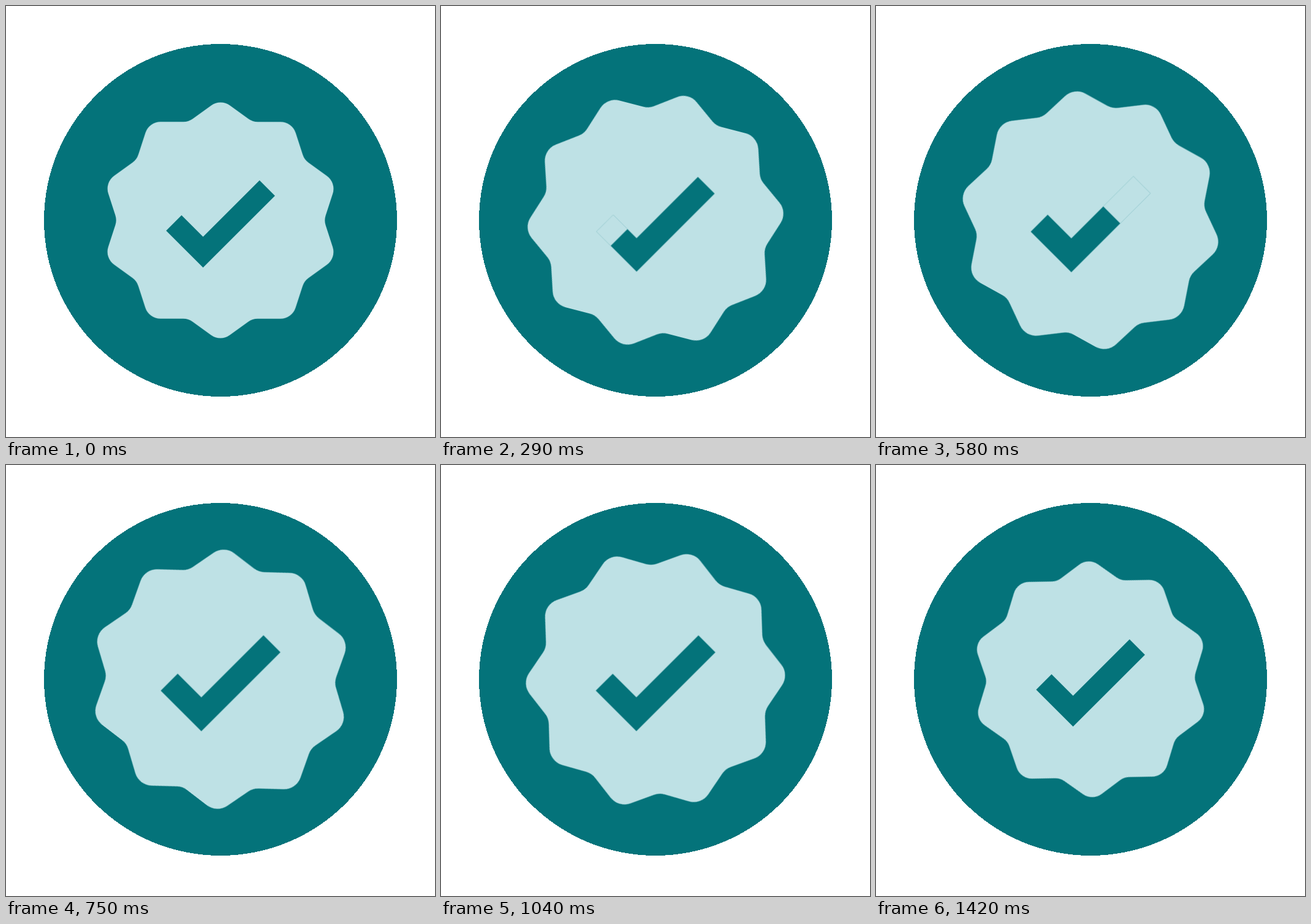
An HTML page that plays this animation: 700 by 704 pixels, repeating every 1.46 s.

```html
<!DOCTYPE html>
<html lang="en">
<head>
<meta charset="utf-8">
<title>Verified badge</title>
<style>
  :root { --teal: #04737a; --pale: #bee1e5; }
  html, body { margin: 0; width: 100%; height: 100%; overflow: hidden; background: #fff; }
  svg { display: block; width: 700px; height: 704px; }

  .disc { fill: var(--teal); shape-rendering: crispEdges; }
  .seal { fill: var(--pale); }
  .tick { fill: none; stroke: var(--teal); stroke-width: 35.6; stroke-linejoin: miter; }
  .wipe { stroke: var(--pale); stroke-dasharray: 3 30; stroke-dashoffset: 4; }

  .pulse, .seal, .wipe { animation: 1460ms linear infinite; }
  .pulse { animation-name: pulse; }
  .seal { animation-name: spin; }
  .wipe { animation-name: wipe; }

  @keyframes pulse {
    0% { transform: scale(1); animation-timing-function: cubic-bezier(.45, 0, .55, 1); }
    27.4% { transform: scale(1.1); }
    69.04% { transform: scale(1.1); animation-timing-function: cubic-bezier(.45, 0, .55, 1); }
    96.44%, 100% { transform: scale(1); }
  }
  @keyframes spin {
    from { transform: rotate(0deg); }
    to { transform: rotate(73deg); }
  }
  /* A pale dash runs along the tick, hiding it and then revealing it again. */
  @keyframes wipe {
    0%, 14.27% { stroke-dashoffset: 4; }
    48.52%, 100% { stroke-dashoffset: -8; }
  }
</style>
</head>
<body>
<svg viewBox="0 0 700 704">
  <g transform="translate(350 350)">
    <circle class="disc" r="288"/>
    <g class="pulse">
      <path class="seal" id="seal"/>
      <path class="tick" d="M-76.15 4.35L-28.45 52.05L76.3-52.7"/>
      <path class="tick wipe" pathLength="7" d="M-76.15 4.35L-28.45 52.05L76.3-52.7"/>
    </g>
  </g>
</svg>
<script>
  // Ten-pointed star with rounded tips and valleys.
  const POINTS = 10, APOTHEM = 160.7, ROUND = 26;
  const rad = deg => deg * Math.PI / 180;
  const corner = i => {
    const r = APOTHEM / Math.cos(rad(i % 2 ? 18 : 36));
    const a = rad(i * 18);
    return [r * Math.sin(a), -r * Math.cos(a)];
  };
  const toward = ([x, y], [u, v], dist) => {
    const k = dist / Math.hypot(u - x, v - y);
    return `${(x + (u - x) * k).toFixed(2)} ${(y + (v - y) * k).toFixed(2)}`;
  };

  let d = '';
  for (let i = 0; i < POINTS * 2; i++) {
    const tip = i % 2 === 0;
    const p = corner(i);
    const cut = ROUND / Math.tan(rad(tip ? 54 : 72));
    d += `${i ? 'L' : 'M'}${toward(p, corner(i + 2 * POINTS - 1), cut)}`
       + `A${ROUND} ${ROUND} 0 0 ${tip ? 1 : 0} ${toward(p, corner(i + 1), cut)}`;
  }
  document.getElementById('seal').setAttribute('d', d + 'Z');
</script>
</body>
</html>
```
